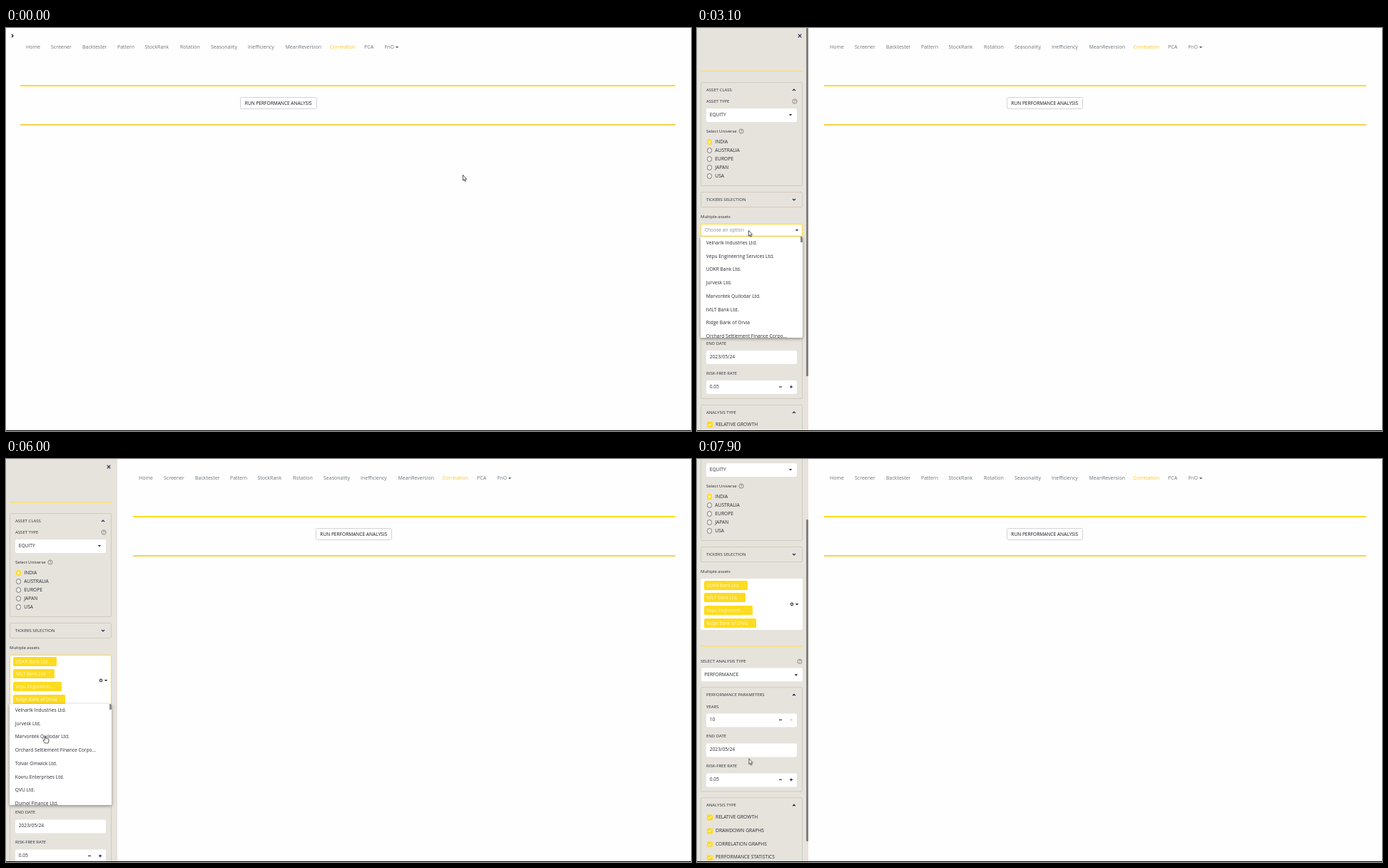
These frames come from a looping animation (960x566 px, 8000 ms). An HTML page:

```html
<!DOCTYPE html>
<html lang="en">
<head>
<meta charset="utf-8">
<title>Correlation dashboard</title>
<style>
@property --n { syntax: "<number>"; inherits: true; initial-value: 0; }
html, body { margin: 0; width: 960px; height: 566px; overflow: hidden; }
body { position: relative; background: #fefefe; font: 6.7px/10px "Open Sans", "Noto Sans", sans-serif; color: #2b2c35; }
div, span, svg { position: absolute; box-sizing: border-box; white-space: nowrap; }
svg { width: 1px; height: 1px; overflow: visible; fill: none; }
.go, #side, #cursor, #arrow, #hand { animation: 8s linear infinite; }
.small { font-size: 6px; }
.grey { color: #8a8a90; }

/* main page */
#nav { font-size: 7px; color: #6d757b; animation-name: nav; }
#nav .on { color: #fbc52c; }
.rule { right: 22px; animation-name: rule; animation-timing-function: step-end; }
#run { top: 96.5px; width: 107.5px; height: 17px; border: .8px solid #d3d4d8; border-radius: 2.5px; text-align: center;
  line-height: 15.6px; font-size: 6.6px; color: #15161c; animation-name: run; animation-timing-function: step-end; }
#nav { animation-timing-function: step-end; }
#floor { left: 0; top: 565px; width: 960px; height: 1px; background: #000; }
@keyframes nav { 0% { transform: none } 23.75%, 100% { transform: translateX(158px) } }
@keyframes rule { 0% { left: 20px } 23.75%, 100% { left: 178px } }
@keyframes run { 0% { left: 328px } 23.75%, 100% { left: 433.5px } }

/* sidebar: --n counts the chosen assets */
#side { left: 0; top: 0; width: 156px; height: 565px; overflow: hidden; background: #e6e3dc;
  animation-name: slide, count; animation-timing-function: ease, step-end; }
#body { left: 0; top: 0; animation-name: scroll; animation-timing-function: ease-in-out; }
#low { left: 0; top: 0; transform: translateY(calc(17.8px * max(0, var(--n) - 1))); }
#track { left: 153px; top: 0; width: 3px; height: 565px; background: #e9e0da; }
#thumb { left: 153px; top: 0; width: 2.6px; height: calc(489px - 12.3px * max(0, var(--n) - 1)); border-radius: 1px;
  background: #837f7c; animation-name: thumb, thumbmove; animation-timing-function: step-end, ease-in-out; }
@keyframes slide { 0%, 23.75% { transform: translateX(-156px) } 28.75%, 100% { transform: none } }
@keyframes count { 0% { --n: 0 } 47.5% { --n: 1 } 57.5% { --n: 2 } 66.25% { --n: 3 } 72.5%, 100% { --n: 4 } }
@keyframes scroll { 0%, 95% { transform: none } 98.75%, 100% { transform: translateY(-107px) } }
@keyframes thumb { 0% { opacity: 1 } 42.5% { opacity: 0 } 83.75%, 100% { opacity: 1 } }
@keyframes thumbmove { 0%, 95% { transform: none } 98.75%, 100% { transform: translateY(85px) } }
.pane { left: 5.2px; width: 143px; border: .8px solid #cfcbc2; border-radius: 2px; }
.field { height: 19px; background: #fff; border-radius: 2px; }
.line { left: 5px; width: 143px; background: #ffe03c; }
.radio { left: 14px; width: 7.4px; height: 7.4px; border: .8px solid #77767a; border-radius: 50%; background: #efede9; }
.radio.on { border: 2px solid #fddb20; background: #fff6c4; }
.box { left: 14px; width: 7.6px; height: 7.6px; border-radius: 1.2px; background: #fddb20; }

/* asset picker */
#pick { left: 5.2px; top: 274.5px; width: 143px; height: calc(18.7px + 17.8px * max(0, var(--n) - 1)); overflow: hidden;
  background: #fff; border-radius: 2px; border: .9px solid #fff; animation-name: focus; animation-timing-function: step-end; }
#pick > .grey { left: 4.6px; top: 3.6px; opacity: calc(1 - var(--n)); }
#tags { left: 3.4px; top: 2px; opacity: min(1, var(--n)); }
#tags div { position: relative; width: max-content; height: 13px; margin-bottom: 4.8px; padding: 0 11px 0 3.6px;
  border-radius: 1.5px; background: #fddb20; color: #fff7cf; font-size: 6.4px; line-height: 13px; }
#tags svg { left: calc(100% - 6px); top: 6.5px; }
#pickicons { left: 0; top: 50%; }
#clear { left: 0; top: 0; opacity: min(1, var(--n)); }
@keyframes focus { 0% { border-color: #fff } 37.5% { border-color: #fdd83c } 87.5%, 100% { border-color: #fff } }
#list { left: 5.2px; top: 292.9px; width: 143px; height: 142px; overflow: hidden; background: #fff; border-radius: 1.5px;
  box-shadow: 0 1.5px 4px #0006; animation-name: show, drop; animation-timing-function: step-end, ease; }
.row { position: relative; height: calc(18.75px * clamp(0, var(--k) - var(--n), 1)); overflow: hidden;
  padding-left: 7.6px; line-height: 18.75px; }
#hot { left: 0; width: 140.5px; height: 18.75px; background: #e6e3dc; animation-name: hot; animation-timing-function: step-end; }
#knob { right: 0; top: 0; width: 2.8px; height: 8.5px; background: #8c8a88; }
@keyframes show { 0% { visibility: hidden } 37.5% { visibility: visible } 87.5%, 100% { visibility: hidden } }
@keyframes drop {
  0%, 57.5% { transform: none } 61%, 66.25% { transform: translateY(17.8px) }
  69.75%, 72.5% { transform: translateY(35.6px) } 76.9%, 100% { transform: translateY(53.4px) }
}
@keyframes hot {
  0% { top: -20px } 43.75% { top: 37.5px } 47.5% { top: -20px } 55% { top: 56.25px } 56% { top: 75px } 57.5% { top: -20px }
  62.5% { top: 18.75px } 66.25% { top: -20px } 71% { top: 56.25px } 72.5% { top: -20px } 76.25%, 100% { top: 37.5px }
}

/* pointer */
#cursor { left: 0; top: 0; animation-name: move, blink; animation-timing-function: linear, step-end; }
#cursor path { fill: #fff; stroke: #222; stroke-width: .8; stroke-linejoin: round; }
#arrow { animation-name: arrow; animation-timing-function: step-end; }
#hand { animation-name: hand; animation-timing-function: step-end; }
@keyframes move {
  0% { transform: translate(640px, 206px) } 5% { transform: translate(475px, 105px) } 10% { transform: translate(322px, 18px) }
  12.5% { transform: translate(107px, 13px) } 13.75% { transform: translate(52px, 10px) }
  15%, 17.5% { transform: translate(21px, 8px) } 18.75%, 21.25% { transform: translate(9px, 9px) }
  26.25% { transform: translate(146px, 163px) } 30% { transform: translate(138px, 205px) }
  35% { transform: translate(76px, 281px) } 38.75%, 41.25% { transform: translate(72px, 284px) }
  45%, 52.5% { transform: translate(70px, 340px) } 56.25%, 58.75% { transform: translate(63px, 376px) }
  62.5%, 67.5% { transform: translate(58px, 343.5px) } 71.25%, 80% { transform: translate(55px, 388.5px) }
  85%, 87.5% { transform: translate(118.5px, 263.5px) } 92.5%, 100% { transform: translate(72.5px, 420.5px) }
}
@keyframes blink { 0% { opacity: 1 } 10.5% { opacity: 0 } 12%, 100% { opacity: 1 } }
@keyframes arrow { 0% { opacity: 1 } 18.75% { opacity: 0 } 22% { opacity: 1 } 42.5% { opacity: 0 } 82%, 100% { opacity: 1 } }
@keyframes hand { 0% { opacity: 0 } 18.75% { opacity: 1 } 22% { opacity: 0 } 42.5% { opacity: 1 } 82%, 100% { opacity: 0 } }
</style>
</head>
<body>
<div id="open"></div>
<div id="nav" class="go"></div>
<div class="rule go" style="top:80px;height:2px;background:#fddb20"></div>
<div class="rule go" style="top:135px;height:1.6px;background:#f9d14a"></div>
<div id="run" class="go">RUN PERFORMANCE ANALYSIS</div>
<div id="side">
  <div id="track"></div>
  <div id="body" class="go">
    <div id="top"></div>
    <div id="low"></div>
    <div id="pick" class="go">
      <span class="grey">Choose an option</span>
      <div id="tags"></div>
      <div id="pickicons"></div>
    </div>
    <div id="list" class="go"><div id="hot" class="go"></div></div>
  </div>
  <div id="thumb" class="go"></div>
</div>
<div id="floor"></div>
<div id="cursor">
  <svg id="arrow"><path d="M.3 .3V8.2L2 6.7 3.2 9.4 4.5 8.8 3.3 6.2H5.6Z"/></svg>
  <svg id="hand"><path d="M-.8 6.4V1.1Q0 0 .8 1.1V4Q1.7 3.4 2.3 4.3 3.2 3.8 3.8 4.7 4.9 4.5 4.9 5.7V8L4 10.6H-.6L-3 7Q-2.8 5.6-1.8 6.2Z"/></svg>
</div>
<script>
const $ = id => document.getElementById(id);
const add = (id, ...parts) => $(id).insertAdjacentHTML("beforeend", parts.join(""));

const INK = "#23215a";
const paths = {
  up: "M-2 1 0-1 2 1", down: "M-2-1 0 1 2-1", next: "M-1-2 1 0-1 2",
  cross: "M-2.3-2.3 2.3 2.3M2.3-2.3-2.3 2.3", tiny: "M-1.2-1.2 1.2 1.2M1.2-1.2-1.2 1.2",
  minus: "M-2 0H2", plus: "M-2 0H2M0-2V2", tick: "M-2 0-.6 1.5 2.1-1.5"
};
const icon = (name, x, y, color = INK, w = 1.1) =>
  `<svg style="left:${x}px;top:${y}px"><path d="${paths[name]}" stroke="${color}" stroke-width="${w}"/></svg>`;
const caret = (x, y, color = "#222") =>
  `<svg style="left:${x}px;top:${y}px"><path d="M-2.2-1.1H2.2L0 1.3Z" fill="${color}"/></svg>`;
const text = (x, y, s, cls = "") => `<span class="${cls}" style="left:${x}px;top:${y - 5}px">${s}</span>`;
const label = (x, y, s) => text(x, y, s, "small");
const rect = (cls, y, h) => `<div class="${cls}" style="top:${y}px;height:${h}px"></div>`;
const field = (x, w, y, s) =>
  `<div class="field" style="left:${x}px;width:${w}px;top:${y - 9.5}px"></div>` + text(x + 4.7, y, s);
const help = (x, y) =>
  `<svg style="left:${x}px;top:${y}px"><circle r="3.1" stroke="#66656c" stroke-width=".7"/>` +
  `<text y="1.8" font-size="5" text-anchor="middle" fill="#55545c">?</text></svg>`;
const head = (y, s, dir) => label(13, y, s) + icon(dir, 135.5, y);
const stepper = (y, plus) => icon("minus", 117, y) + icon("plus", 132, y, plus);

// main page
add("open", icon("next", 9, 10.5, "#111", 1.2));
const tabs = { Home: 28, Screener: 63, Backtester: 107, Pattern: 156, StockRank: 194.5, Rotation: 244, Seasonality: 287,
  Inefficiency: 339, MeanReversion: 391.5, Correlation: 453.5, PCA: 502, FnO: 530.5 };
for (const [name, x] of Object.entries(tabs)) add("nav", text(x, 27, name, name == "Correlation" ? "on" : ""));
add("nav", caret(548.3, 27, "#555c62"));

// sidebar above the picker
add("top",
  icon("cross", 144.2, 10.5), rect("line", 60, 1.2),
  rect("pane", 75.5, 146.5), head(86.5, "ASSET CLASS", "up"),
  label(13, 103, "ASSET TYPE"), help(136.5, 103),
  field(13, 127, 122, "EQUITY"), caret(131, 122),
  label(13, 144.5, "Select Universe"), help(62, 144.5),
  ...["INDIA", "AUSTRALIA", "EUROPE", "JAPAN", "USA"].map((s, i) =>
    rect(i ? "radio" : "radio on", 156.3 + 12 * i, 7.4) + text(25.3, 160 + 12 * i, s)),
  rect("pane", 229.5, 22), head(240.5, "TICKERS SELECTION", "down"),
  label(5, 265, "Multiple assets"));

// sidebar below the picker
add("low",
  rect("line", 315.5, 1.8),
  label(5, 337.5, "SELECT ANALYSIS TYPE"), help(144, 337.5),
  field(5.5, 142.5, 356.5, "PERFORMANCE"), caret(139.3, 356.5),
  rect("pane", 373.5, 147.5), head(384.5, "PERFORMANCE PARAMETERS", "up"),
  label(13, 401.5, "YEARS"), field(13, 127, 420, "10"), stepper(420, "#d5d5dc"),
  label(13, 442.5, "END DATE"), field(13, 127, 462, "2023/05/24"),
  label(13, 485, "RISK-FREE RATE"), field(13, 127, 504, "0.05"), stepper(504, INK),
  rect("pane", 529, 160), head(540, "ANALYSIS TYPE", "up"),
  ...["RELATIVE GROWTH", "DRAWDOWN GRAPHS", "CORRELATION GRAPHS", "PERFORMANCE STATISTICS"].map((s, i) => {
    const y = 557 + 18.8 * i;
    return rect("box", y - 3.8, 7.6) + icon("tick", 17.8, y, "#fff", 1) + text(26, y, s);
  }));

// picker: each row is [name, turn in which it is chosen]
const NEVER = 99;
const rows = [["Velnarik Industries Ltd.", NEVER], ["Vepu Engineering Services Ltd.", 3], ["UDKR Bank Ltd.", 1],
  ["Jurvesk Ltd.", NEVER], ["Marvontek Quilodar Ltd.", NEVER], ["IVILT Bank Ltd.", 2], ["Ridge Bank of Orvia", 4],
  ["Orchard Settlement Finance Corpo…", NEVER], ["Tolvar Omwick Ltd.", NEVER], ["Kovru Enterprises Ltd.", NEVER],
  ["QVU Ltd.", NEVER], ["Dumol Finance Ltd.", NEVER]];
add("list", ...rows.map(([s, k]) => `<div class="row" style="--k:${k}">${s}</div>`), `<div id="knob"></div>`);
const cut = s => s.length > 20 ? s.slice(0, 15) + "…" : s;
add("tags", ...rows.filter(r => r[1] < NEVER).sort((a, b) => a[1] - b[1])
  .map(([s]) => `<div>${cut(s)}${icon("tiny", 0, 0, "#fff", 1)}</div>`));
add("pickicons", `<div id="clear"><svg style="left:126.6px"><circle r="2.4" fill="#55545c"/></svg>`,
  icon("tiny", 126.6, 0, "#fff", .7), "</div>", caret(134.2, 0));
</script>
</body>
</html>
```
